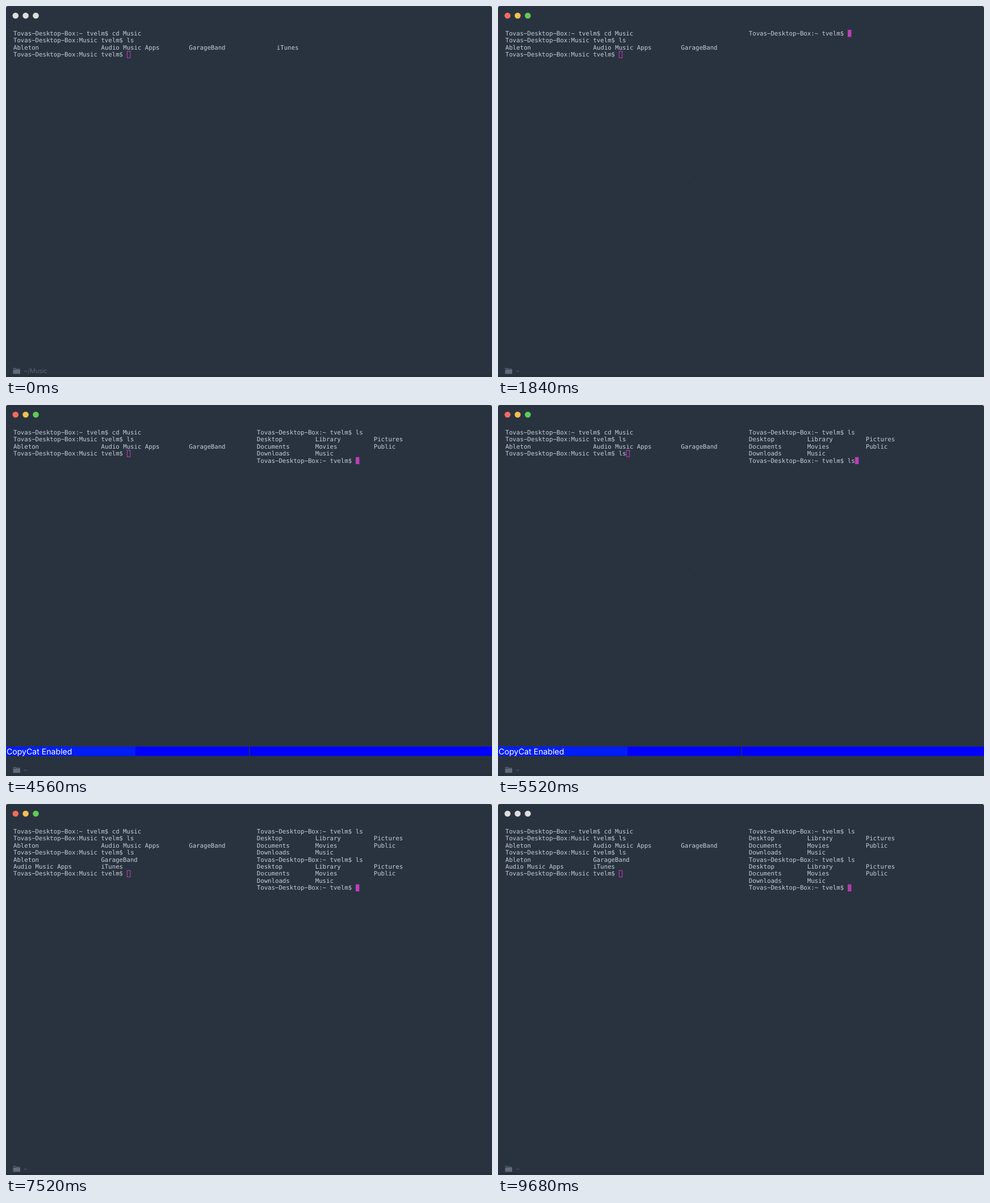
These frames come from a looping animation (856x654 px, 9.76 s). An HTML page:

```html
<!DOCTYPE html>
<html lang="en">
<head>
<meta charset="utf-8">
<title>Terminal panes</title>
<style>
  html, body { margin: 0; width: 100%; height: 100%; overflow: hidden; background: #d4d7da; }
  svg { display: block; width: 856px; height: 654px; }
  text { white-space: pre; text-rendering: geometricPrecision; }
  #screen text { font: 10.7px "DejaVu Sans Mono", monospace; fill: #c5cdd9; }
  #path { font: 300 11px Inter, sans-serif; fill: #66717e; }
  #banner text { font: 14.1px Inter, sans-serif; fill: #fff; }
</style>
</head>
<body>
<svg viewBox="0 0 856 654">
  <path d="M0 654V4Q0 0 4 0H852Q856 0 856 4V654Z" fill="#29333f"/>
  <rect y="650" width="856" height="4" fill="#262f3b"/>
  <g id="lights">
    <circle cx="16.8" cy="17" r="5.3"/>
    <circle cx="34.6" cy="17" r="5.3"/>
    <circle cx="52.5" cy="17" r="5.3"/>
  </g>
  <g id="screen"></g>
  <rect id="speck" x="347" y="300" width="1.5" height="1.5" fill="#1b232d"/>
  <g id="banner">
    <rect y="602" width="428" height="16.5" fill="#00f"/>
    <rect y="602" width="228" height="16.5" fill="#001ef5"/>
    <rect x="429.5" y="602" width="426.5" height="16.5" fill="#00f"/>
    <text x="1" y="616">CopyCat Enabled</text>
  </g>
  <g fill="#606c7a">
    <path d="M12.5 640V638.3H17.3L18.6 639.5H24.6V640.6H18L16.8 639.4H13.5V640Z"/>
    <path d="M12.5 640.9H25V648.4H12.5Z"/>
  </g>
  <text id="path" x="31" y="647"></text>
</svg>
<script>
const LOOP = 9760, CELL = 6.442, ROW = 12.44, BASE = 51.8;
const SPLIT = 1760, LIST = 3200, MIRROR_ON = 4560, TYPE_L = 5440, TYPE_S = 5520,
      MIRROR_LIST = 6160, MIRROR_OFF = 7520, BLUR = 9680;
const PANES = [13, 441.8];
const $ = id => document.getElementById(id);
const parts = [];

function add(tag, attrs) {
  const el = document.createElementNS("http://www.w3.org/2000/svg", tag);
  for (const key in attrs) el.setAttribute(key, attrs[key]);
  return $("screen").appendChild(el);
}

function show(el, on) {
  el.style.display = on ? "" : "none";
}

function put(pane, row, col, text, from = 0, to = LOOP) {
  const el = add("text", { x: PANES[pane] + col * CELL, y: BASE + row * ROW });
  el.textContent = text;
  parts.push({ el, from, to });
}

function typeLs(pane, row, col, first, second) {
  put(pane, row, col, "l", first);
  put(pane, row, col + 1, "s", second);
}

const prompt = dir => `Tovas−Desktop−Box:${dir} tvelm$ `;
const musicPrompt = prompt("Music"), homePrompt = prompt("~");

put(0, 0, 0, homePrompt + "cd Music");
put(0, 1, 0, musicPrompt + "ls");
put(0, 2, 0, "Ableton");
put(0, 2, 24, "Audio Music Apps");
put(0, 2, 48, "GarageBand");
put(0, 2, 72, "iTunes", 0, SPLIT);
put(0, 3, 0, musicPrompt);
typeLs(0, 3, 31, TYPE_L, TYPE_S);
put(0, 4, 0, "Ableton".padEnd(24) + "GarageBand", MIRROR_LIST);
put(0, 5, 0, "Audio Music Apps".padEnd(24) + "iTunes", MIRROR_LIST);
put(0, 6, 0, musicPrompt, MIRROR_LIST);

function homeListing(row, from) {
  const names = [["Desktop", "Library", "Pictures"], ["Documents", "Movies", "Public"], ["Downloads", "Music"]];
  names.forEach((line, i) =>
    put(1, row + i, 0, line.map(name => name.padEnd(16)).join(""), from));
  put(1, row + 3, 0, homePrompt, from);
}

put(1, 0, 0, homePrompt, SPLIT);
typeLs(1, 0, 27, 2800, 2880);
homeListing(1, LIST);
typeLs(1, 4, 27, TYPE_L, TYPE_S);
homeListing(5, MIRROR_LIST);

// Cursor steps: time, row, column, fill strength
const cursors = [
  [[0, 3, 31, 0], [880, 3, 31, .5], [960, 3, 31, 1], [SPLIT, 3, 31, .5], [1840, 3, 31, 0],
   [TYPE_L, 3, 32, 0], [TYPE_S, 3, 33, 0], [MIRROR_LIST, 6, 31, 0]],
  [[SPLIT, 0, 27, .5], [1840, 0, 27, 1], [2800, 0, 28, 1], [2880, 0, 29, 1], [LIST, 4, 27, 1],
   [TYPE_L, 4, 28, 1], [TYPE_S, 4, 29, 1], [MIRROR_LIST, 8, 27, 1], [BLUR, 8, 27, .85]]
].map((steps, pane) => ({
  steps, pane,
  el: add("rect", { width: 5.4, height: 11.4, fill: "#c43cbc", stroke: "#c43cbc" })
}));

function drawCursor({ steps, pane, el }, t) {
  const step = steps.filter(s => s[0] <= t).pop();
  show(el, step);
  if (!step) return;
  const [, row, col, fill] = step;
  el.setAttribute("x", PANES[pane] + col * CELL + .7);
  el.setAttribute("y", BASE + row * ROW - 9.2);
  el.setAttribute("fill-opacity", fill);
}

const lightColors = ["#f26b5e", "#f6be4f", "#5fcb54"];

function draw(t) {
  const focused = t >= 880 && t < BLUR;
  [...$("lights").children].forEach((el, i) =>
    el.setAttribute("fill", focused ? lightColors[i] : "#dedede"));
  for (const { el, from, to } of parts) show(el, t >= from && t < to);
  cursors.forEach(cursor => drawCursor(cursor, t));
  show($("banner"), t >= MIRROR_ON && t < MIRROR_OFF);
  show($("speck"), t >= 80 && t < BLUR);
  $("path").textContent = t < SPLIT ? "~/Music" : "~";
}

const start = performance.now();
function tick() {
  draw((performance.now() - start) % LOOP);
  requestAnimationFrame(tick);
}
tick();
</script>
</body>
</html>
```
